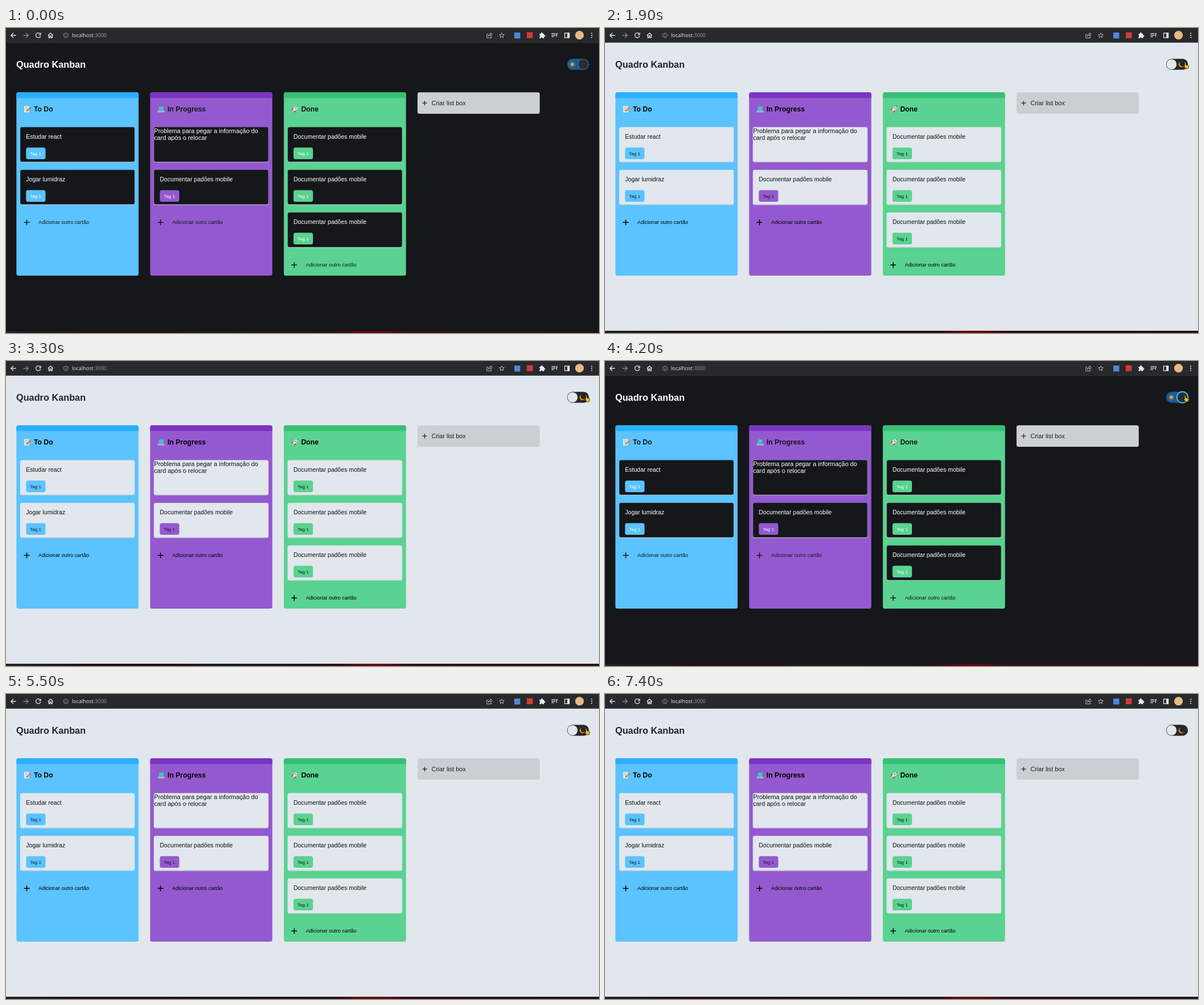
Write an HTML page that moves like this. It is 1043 by 537 pixels and loops after 7500 ms.

```html
<!DOCTYPE html>
<html lang="pt-BR">
<head>
<meta charset="utf-8">
<title>Quadro Kanban</title>
<style>
  html, body { margin: 0; width: 100%; height: 100%; overflow: hidden; }
  svg { display: block; font-family: "Liberation Sans", Arial, sans-serif; }
  svg {
    --page: #e1e7ec; --title: #222428; --ink: #111315; --tag: #15171a;
    --head: #000; --box: #cacfd4;
  }
  svg.dark {
    --page: #15171a; --title: #fff; --ink: #fff; --tag: #fff;
    --head: #15171a; --box: #cbd0d4;
  }
  .page { fill: var(--page); }
  .title { fill: var(--title); font: bold 16.3px "Liberation Sans", Arial, sans-serif; }
  .head { fill: var(--head); font: bold 12.22px "Liberation Sans", Arial, sans-serif; }
  .card { fill: var(--ink); font-size: 10.5px; }
  .loose { fill: var(--ink); font-size: 10.87px; }
  .tag { fill: var(--tag); font-size: 8.1px; }
  .add { fill: var(--head); font-size: 9.1px; }
  .plus { stroke: var(--head); fill: none; }
  .url { font: 9.05px "Open Sans", "Noto Sans", sans-serif; fill: #e8eaed; }
  .icon { fill: none; stroke: #e4e5e7; stroke-width: 1.3; }
</style>
</head>
<body>
<svg id="stage" class="dark" width="1043" height="537" viewBox="0 0 1043 537">
  <defs>
    <linearGradient id="strip">
      <stop offset="0" stop-color="#202127"/><stop offset=".1" stop-color="#22191f"/>
      <stop offset=".14" stop-color="#2b0d14"/><stop offset=".28" stop-color="#2b0f17"/>
      <stop offset=".34" stop-color="#1d1b21"/><stop offset=".56" stop-color="#271219"/>
      <stop offset=".59" stop-color="#5c0710"/><stop offset=".63" stop-color="#680610"/>
      <stop offset=".68" stop-color="#30101a"/><stop offset="1" stop-color="#291119"/>
    </linearGradient>
    <filter id="soft" x="-50%" y="-50%" width="200%" height="200%"><feGaussianBlur stdDeviation=".6"/></filter>
  </defs>
  <rect class="page" width="1043" height="537"/>
  <rect width="1043" height="25.5" fill="#28292b"/>
  <rect y="25" width="1043" height=".7" fill="#3b3c3f"/>
  <rect y="533" width="1043" height="4" fill="url(#strip)"/>

  <g class="icon">
    <path d="M17.5 13H9M13 8.7 8.7 13l4.3 4.3"/>
    <path d="M30.5 13H39M35 8.7 39.3 13 35 17.3" stroke="#85878a"/>
    <path d="M60.2 10.4A4.2 4.2 0 1 0 60.8 14M61 8.6v3.2h-3.2"/>
    <path d="M73.8 13 78.3 8.9l4.5 4.1M75.3 12.2v4.9h2v-3.2h2v3.2h2v-4.9"/>
    <g stroke="#a0a2a5" stroke-width=".9"><circle cx="105.4" cy="13" r="4"/><path d="M105.4 12.4v3M105.4 10.4v1"/></g>
    <g stroke="#b9bbbe" stroke-width="1">
      <path d="M848 10.8h-2.2v6.7h7.8v-2.2M848.3 14.8c.3-3 2-4.3 4.2-4.3V8.4l2.8 3.2-2.8 3.1v-2.1c-1.8 0-3.1.5-4.2 2.2Z"/>
      <path d="m872 8.7 1.25 2.8 3.05.3-2.3 2.05.7 3-2.7-1.6-2.7 1.6.7-3-2.3-2.05 3.05-.3Z"/>
    </g>
    <path d="M959.5 9.8h7.2M959.5 12.6h7.2M959.5 15.4h4.4M968.5 15.5V9.8h2"/>
    <rect x="982.6" y="9" width="8" height="8"/>
  </g>
  <rect x="987.2" y="8.5" width="4" height="9" fill="#e4e5e7"/>
  <rect x="894" y="8" width="10.5" height="10.5" fill="#4f86dc"/>
  <rect x="916" y="7.5" width="10.5" height="10.5" fill="#cf3b36"/>
  <path d="M938.4 10h2.6a1.6 1.6 0 1 1 3 0h2.3v2.5a1.6 1.6 0 1 1 0 3v2.5h-2.5a1.5 1.5 0 0 0-3 0h-2.4v-2.6a1.5 1.5 0 0 0 0-2.9Z" fill="#e8eaed"/>
  <circle cx="1008.7" cy="12.7" r="7.6" fill="#e9b884"/>
  <g fill="#d9dadc"><circle cx="1030.2" cy="9.3" r="1.1"/><circle cx="1030.2" cy="12.9" r="1.1"/><circle cx="1030.2" cy="16.5" r="1.1"/></g>
  <text class="url" x="116" y="16.2">localhost<tspan fill="#9a9da1">:3000</tspan></text>

  <text class="title" x="18" y="69.7">Quadro Kanban</text>
  <g id="board"></g>
  <rect x="723.8" y="113.3" width="215" height="37.7" rx="3.5" fill="var(--box)"/>
  <path d="M732.4 132.2h8M736.4 128.2v8" fill="none" stroke="#1c1e21" stroke-width="1.2"/>
  <text x="748.4" y="135.9" font-size="10.87" fill="#1c1e21">Criar list box</text>

  <g id="toggle">
    <rect x="987" y="54.3" width="38.3" height="19.2" rx="9.6" fill="#26282b"/>
    <g id="sunSide">
      <rect x="987" y="54.3" width="38.3" height="19.2" rx="9.6" fill="#175c95"/>
      <path id="rays" fill="none" stroke="#f2a71b" stroke-width="1.1"/>
      <circle cx="996" cy="64" r="2.7" fill="#f7a81b"/>
    </g>
    <path id="moon" d="M1012.6 59.2a5 5 0 1 0 5.6 7.4 4.6 4.6 0 0 1-5.6-7.4Z" fill="#f5a000"/>
    <g id="knob">
      <circle id="ring" r="10.8" fill="#33bbff" filter="url(#soft)"/>
      <circle r="8.9" fill="#e1e7ec"/>
      <circle id="knobDark" r="8.9" fill="#2a2c30"/>
    </g>
  </g>
  <g id="cursor" fill="#ffb51c" stroke="#17130a" stroke-width=".7" stroke-linejoin="round">
    <path id="arrow" d="M.4.5v9.7l2.2-2 1.5 3.3 1.5-.7-1.5-3.2H7Z"/>
    <path id="hand" d="M2.4.8c.9 0 1.2.6 1.2 1.3v2.7l3.8.7c1 .2 1.5.8 1.4 1.8L8.3 10 7.5 11.8H3.6L.6 8.2C.1 7.4.8 6.6 1.4 7V2C1.4 1.3 1.7.8 2.4.8Z"/>
  </g>
</svg>
<script>
const LOOP = 7500, STEP = 100, SLIDE = 250, FADE = 150;
const $ = id => document.getElementById(id);
const clamp = v => Math.max(0, Math.min(1, v));

const emoji = {
  memo: `<path d="M1 .8h8.5v11H1Z" fill="#eef1f4"/><path d="M2.4 3h5.5M2.4 5h5M2.4 7h3.5M2.4 9.2h5" stroke="#8d9baa" stroke-width=".7"/>
    <path d="m5.2 10 .9-2.6 4.6-4.5 1.9 1.9L8 9.2Z" fill="#f0872d"/><path d="m10 3.6 1-1 2 1.9-1.1 1Z" fill="#e0475b"/><path d="m5.2 10 .8-2.2 1.5 1.5Z" fill="#56301d"/>`,
  laptop: `<path d="M2.8.8H12l-.8 7.5H2Z" fill="#6f7d91"/><path d="M3.5 1.5h7.7l-.6 6.1H2.8Z" fill="#36c4ed"/>
    <path d="M2 8.3h9.2l2 3H.3Z" fill="#c4c9d6"/><path d="M2.5 9h8.4l.7 1H1.9Z" fill="#79839a"/><path d="M.3 11.3h12.9v.8H.3Z" fill="#8d95a8"/>`,
  rocket: `<path d="M2.6 8.5.5 12.3l4-1.7Z" fill="#ffb52b"/><path d="M5 4.2 2 5 .7 8l3-.5ZM8.7 8 8.2 11l-3 1.3.6-3.6Z" fill="#dc3653"/>
    <path d="M12.6.5C8.5.7 5.2 3.2 3.2 7.4l2.2 2.3C9.8 7.8 12.4 4.6 12.6.5Z" fill="#edf0f4"/>
    <path d="M12.6.5 9.5 1.3 11.7 3.6Z" fill="#dc3653"/><circle cx="8.5" cy="4.6" r="1.25" fill="#3b91bf"/>`
};

const task = "Documentar padões mobile";
const columns = [
  { name: "To Do", icon: "memo", fill: "#5bc3ff", top: "#2aafff", cards: ["Estudar react", "Jogar lumidraz"] },
  { name: "In Progress", icon: "laptop", fill: "#9459cf", top: "#7b35c1", cards: [["Problema para pegar a informação do", "card após o relocar"], task] },
  { name: "Done", icon: "rocket", fill: "#5ad291", top: "#37c074", cards: [task, task, task] }
];

function cardMarkup(content, y, fill) {
  const body = Array.isArray(content)
    ? content.map((line, i) => `<text class="loose" x="6.9" y="${y + 10 + i * 12.4}">${line}</text>`).join("")
    : `<text class="card" x="17" y="${y + 20.6}">${content}</text>
       <rect x="17" y="${y + 35.8}" width="34.2" height="20.5" rx="3.5" fill="${fill}"/>
       <text class="tag" x="24" y="${y + 49}">Tag 1</text>`;
  return `<rect x="6.3" y="${y + .2}" width="202.1" height="62" rx="3.5" fill="#cdd2d6" opacity=".65"/>
    <rect class="page" x="6.8" y="${y}" width="201.1" height="60.9" rx="3"/>${body}`;
}

$("board").innerHTML = columns.map((col, i) => {
  const addY = 192 + col.cards.length * 75.1;
  return `<g transform="translate(${18.3 + i * 235.2})">
    <rect y="113.3" width="214.9" height="322.7" rx="3.5" fill="${col.fill}"/>
    <path d="M0 123.2v-6.4q0-3.5 3.5-3.5h207.9q3.5 0 3.5 3.5v6.4Z" fill="${col.top}"/>
    <g transform="translate(12.6 136.7)">${emoji[col.icon]}</g>
    <text class="head" x="30.6" y="147.2">${col.name}</text>
    ${col.cards.map((card, n) => cardMarkup(card, 174.6 + n * 75.1, col.fill)).join("")}
    <path class="plus" d="M13.2 ${addY}h10M18.2 ${addY - 5}v10" stroke-width="1.5"/>
    <text class="add" x="38.8" y="${addY + 3.1}">Adicionar outro cartão</text></g>`;
}).join("");

$("rays").setAttribute("d", Array.from({ length: 8 }, (_, i) => {
  const a = i * Math.PI / 4, at = r => `${996 + r * Math.cos(a)} ${64 + r * Math.sin(a)}`;
  return `M${at(3.4)}L${at(4.9)}`;
}).join(""));

// Each switch: when the button goes down, when the theme flips. Starts dark.
const flips = [
  [1460, 1600], [2470, 2470], [2950, 3000], [3770, 3770], [4050, 4260],
  [4670, 4670], [5060, 5200], [5670, 5670], [6010, 6100]
];
const arrival = [[200, 162, 199], [500, 470, 152], [800, 880, 97], [900, 966, 105], [1000, 1010, 66], [1100, 1019, 61], [1300, 1018, 60]];
const departure = [[6300, 1018, 60], [6400, 964, 69], [6500, 964, 69], [6700, 610, 42], [6900, 104, 8]];
const route = [...arrival, ...departure];

function cursorAt(t) {
  const next = route.findIndex(p => p[0] >= t);
  if (next < 0 || t < route[0][0]) return null;
  const b = route[next], a = route[Math.max(0, next - 1)];
  const k = b === a ? 0 : (t - a[0]) / (b[0] - a[0]);
  return [a[1] + (b[1] - a[1]) * k, a[2] + (b[2] - a[2]) * k];
}

function draw(t) {
  const count = flips.filter(f => f[1] <= t).length;
  const dark = count % 2 === 0;
  const x = count ? clamp((t - flips[count - 1][1]) / SLIDE) : 1;
  const eased = 1 - (1 - x) ** 2;
  const on = dark ? eased : 1 - eased;
  const glow = Math.max(...flips.map(([down, flip]) =>
    clamp((Math.min(t, flip) - down) / FADE) * clamp(1 - (t - flip) / FADE)));

  $("stage").setAttribute("class", dark ? "dark" : "light");
  $("sunSide").setAttribute("opacity", on);
  $("knobDark").setAttribute("opacity", on);
  $("moon").setAttribute("opacity", 1 - on);
  $("ring").setAttribute("opacity", glow);
  $("knob").setAttribute("transform", `translate(${996.5 + 19.1 * on} 63.9)`);

  const spot = cursorAt(t);
  $("cursor").style.display = spot ? "" : "none";
  if (spot) {
    const overToggle = spot[0] > 985;
    $("cursor").setAttribute("transform", `translate(${spot})`);
    $("hand").style.display = overToggle ? "" : "none";
    $("arrow").style.display = overToggle ? "none" : "";
  }
}

const start = performance.now();
function tick() {
  const t = (performance.now() - start) % LOOP;
  draw(Math.floor(t / STEP) * STEP);
  requestAnimationFrame(tick);
}
tick();
</script>
</body>
</html>
```
